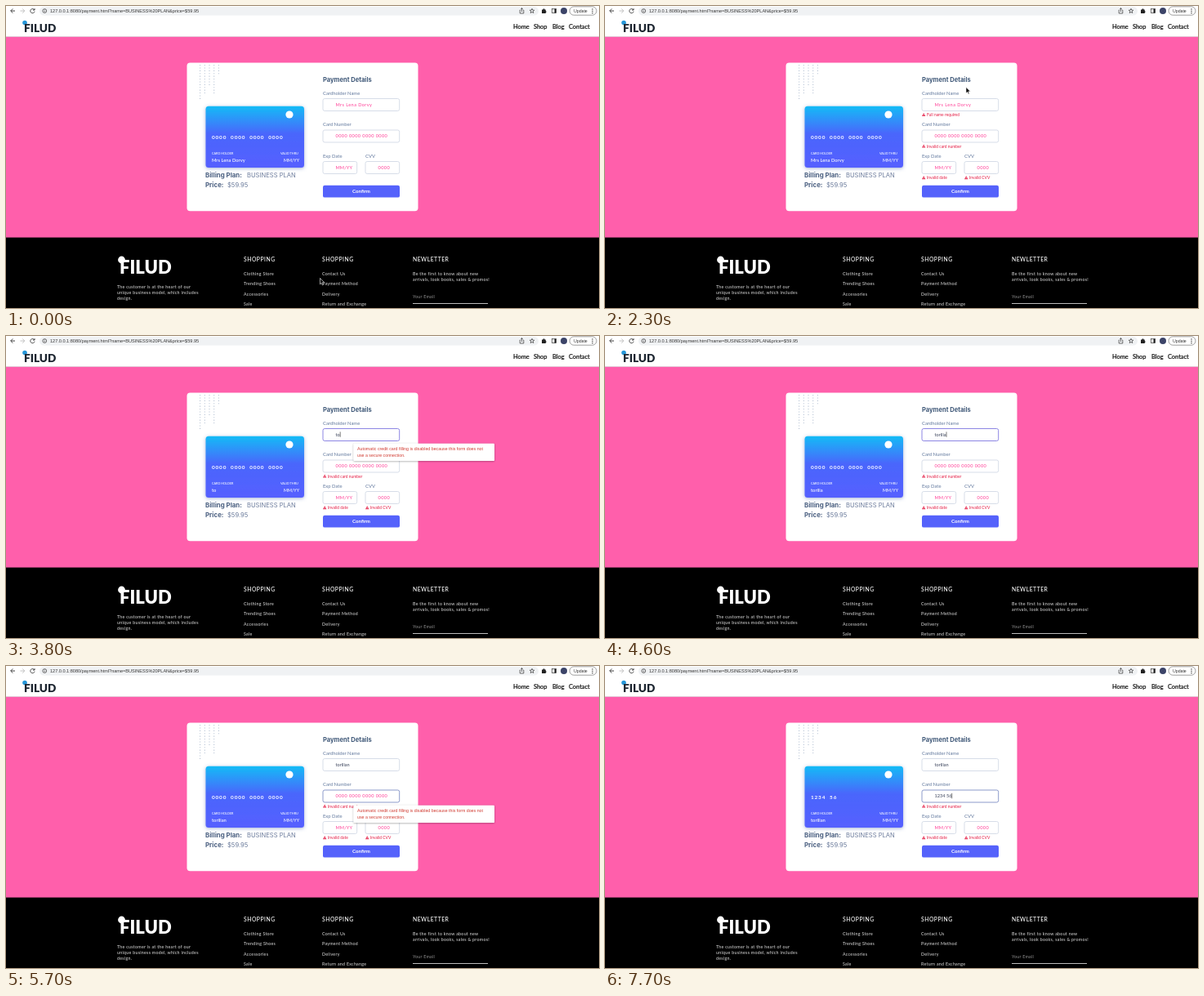
These frames come from a looping animation (726x370 px, 8 s). An HTML page:

```html
<!DOCTYPE html>
<html lang="en">
<head>
<meta charset="utf-8">
<title>Payment form</title>
<style>
  html, body { margin: 0; width: 100%; height: 100%; overflow: hidden; background: #fff; }
  svg { display: block; width: 726px; height: 370px; }
  text { font-family: Lato, "Open Sans", sans-serif; font-weight: 500; white-space: pre; }
  .ui { font: 5.57px "Liberation Sans", sans-serif; fill: #333; }
  .brand { font-weight: 900; }
  .nav { font-size: 7.4px; fill: #111; stroke: #111; stroke-width: .18; }
  .title { font: 700 7.55px Inter, sans-serif; fill: #3f5878; }
  .key { font: 700 7.9px Inter, sans-serif; fill: #4a5f80; }
  .value { font: 400 7.6px Inter, sans-serif; fill: #6c7c9c; }
  .label { font-size: 5.85px; fill: #6e83a5; }
  .hint { font-size: 5.6px; letter-spacing: .4px; fill: #ff4d9e; }
  .typed { font-size: 5.6px; fill: #4a5268; }
  .error { font-size: 4.9px; fill: #e62e53; }
  .small { font-size: 3.75px; fill: #fff; }
  .holder { font-size: 5.8px; fill: #fff; }
  .digits { font-size: 6.4px; font-weight: 700; letter-spacing: .84px; word-spacing: 2.5px; fill: #fff; }
  .head { font-size: 6.8px; letter-spacing: .5px; fill: #fff; }
  .foot { font-size: 5.25px; letter-spacing: .29px; fill: #d0d0d0; }
  .tip { font: 5.27px "Liberation Sans", sans-serif; fill: #d03a30; }
  .line { fill: none; stroke: #333; stroke-width: .9; }
  .field { fill: #fff; stroke: #d3dae6; stroke-width: .9; }
</style>
</head>
<body>
<svg id="stage" viewBox="0 0 726 370">
  <defs>
    <linearGradient id="cardFill" x2="0" y2="1">
      <stop stop-color="#14bcf6"/>
      <stop offset=".45" stop-color="#4a66fc"/>
      <stop offset="1" stop-color="#5560ff"/>
    </linearGradient>
    <filter id="shadow" x="-20%" y="-30%" width="140%" height="170%">
      <feDropShadow dx="0" dy="1" stdDeviation="2.2" flood-color="#4b5fb0" flood-opacity=".5"/>
    </filter>
    <filter id="soft" x="-5%" y="-20%" width="110%" height="150%">
      <feDropShadow dx="0" dy=".6" stdDeviation=".8" flood-opacity=".35"/>
    </filter>
  </defs>

  <!-- page background -->
  <rect width="726" height="370" fill="#fff"/>
  <rect y="37.5" width="726" height="247" fill="#ff5fab"/>
  <rect y="37" width="726" height="1" fill="#e3c5d5"/>
  <rect y="283.6" width="726" height="87"/>

  <!-- browser bar -->
  <rect x="41" y="1" width="611" height="10.4" rx="5.2" fill="#f0f2f4"/>
  <path class="line" d="M11 6H5.8M8.3 3.4 5.7 6l2.6 2.6M34.6 4.6A2.6 2.6 0 1 0 35 6.7M35 3v2h-2"/>
  <path class="line" style="stroke:#bbb" d="M17.5 6h5.2M20.2 3.4 22.8 6l-2.6 2.6"/>
  <g class="line" style="stroke-width:.7">
    <circle cx="47.3" cy="6" r="2.4"/>
    <path d="M47.3 5.6v1.8M47.3 4.3v.6M630 5h-.8v4h4.6V5H633M631.5 7V2.6M630.2 3.8l1.3-1.3 1.3 1.3"/>
    <path d="M644 3.2l.8 1.9 2 .1-1.5 1.3.5 2-1.8-1.1-1.8 1.1.5-2-1.5-1.3 2-.1z"/>
    <rect x="668.5" y="3.6" width="5" height="5"/>
  </g>
  <path d="M656 4.4h1.4a1.1 1.1 0 0 1 2.2 0h1.2v1.5a1.1 1.1 0 0 1 0 2.1v1H656zM671.5 3.6h2v5h-2z" fill="#222"/>
  <circle cx="683" cy="6" r="4" fill="#3c4468"/>
  <rect x="690" y=".8" width="33" height="10.4" rx="5.2" fill="#fff" stroke="#888" stroke-width=".8"/>
  <path d="M718 3.3v6" stroke="#333" stroke-width="1.2" stroke-dasharray="1.2 1.2"/>

  <!-- brand -->
  <circle cx="23" cy="20.5" r="2.8" fill="#2596d8"/>
  <circle cx="141.5" cy="311" r="4.4" fill="#fff"/>

  <!-- panel -->
  <rect x="221.5" y="69.5" width="283" height="181.7" rx="4" fill="#fff"/>
  <g id="dots" stroke="#b9c5d6" stroke-width="1.1" stroke-dasharray="1.1 2.3"></g>
  <rect x="244.5" y="122.7" width="120.5" height="75.3" rx="3.5" fill="url(#cardFill)" filter="url(#shadow)"/>
  <circle cx="347" cy="133" r="4.6" fill="#fff"/>
  <rect id="nameBox" class="field" x="388" y="113.5" width="93.7" height="15" rx="2.2"/>
  <rect id="numberBox" class="field" x="388" y="152" width="93.7" height="15" rx="2.2"/>
  <rect class="field" x="388" y="190.5" width="41.7" height="15" rx="2.2"/>
  <rect class="field" x="440" y="190.5" width="41.7" height="15" rx="2.2"/>
  <rect id="button" x="388" y="219.8" width="94" height="14.8" rx="2.2"/>
  <path d="M498 364.5h92" stroke="#bbb"/>

  <g id="texts"></g>
  <rect id="caret" width=".6" height="6.4" fill="#222"/>
  <g id="tip" filter="url(#soft)">
    <rect x="425.5" y="131.7" width="172.5" height="21.3" rx="1" fill="#fff"/>
    <text class="tip" x="430" y="140.4">Automatic credit card filling is disabled because this form does not</text>
    <text class="tip" x="430" y="148">use a secure connection.</text>
  </g>
  <g id="pointer">
    <path id="arrow" d="M0 0v7.4l1.7-1.6 1.2 2.7 1.2-.5-1.2-2.7h2.4z" stroke="#fff" stroke-width=".6"/>
    <path id="hand" d="M-.6 0q.7-.8 1.2 0v2.6l2.6.7q.5.3.3 1.2L3 6.8H-.4L-2.3 4q.4-.8 1.7.3z" fill="#fff" stroke="#111" stroke-width=".6"/>
    <path id="beam" class="line" style="stroke-width:.6" d="M-1.3-3.3Q0-3.3 0-2.6V2.6Q0 3.3-1.3 3.3M1.3-3.3Q0-3.3 0-2.6M0 2.6Q0 3.3 1.3 3.3"/>
  </g>
</svg>
<script>
const LOOP = 8000, STEP = 100;
const HOLDER = "Mrs Lena Dorvy", ZEROS = "0000 0000 0000 0000";
const NS = "http://www.w3.org/2000/svg";
const $ = id => document.getElementById(id);
const show = (el, on) => { el.style.display = on ? "" : "none"; };

function add(parent, tag, attrs, content = "") {
  const el = parent.appendChild(document.createElementNS(NS, tag));
  for (const key in attrs) el.setAttribute(key, attrs[key]);
  el.textContent = content;
  return el;
}
const text = (cls, x, y, content, style = "") =>
  add($("texts"), "text", { class: cls, x, y, style }, content);
const lines = (cls, x, y, gap, list) =>
  list.forEach((line, i) => text(cls, x, y + i * gap, line));

function errorNote(x, y, message) {
  const group = add($("texts"), "g", { class: "error" });
  add(group, "path", { d: `M${x} ${y}h4.4l-2.2-4.1z` });
  add(group, "path", { d: `M${x + 2.2} ${y - 2.8}v2.2`, stroke: "#fff", "stroke-width": .5 });
  add(group, "text", { x: x + 6, y }, message);
  return group;
}

[115, 107, 97, 107, 84].forEach((bottom, i) =>
  add($("dots"), "path", { d: `M${237.6 + i * 5.7} 72V${bottom}` }));

text("ui", 54, 8, "127.0.0.1:8080/payment.html?name=BUSINESS%20PLAN&price=$59.95");
text("ui", 695, 8, "Update", "font-size:5.2px");
text("brand", 22, 32.3, "FILUD", "font-size:13.6px;fill:#1c2530");
text("brand", 139, 328.3, "FILUD", "font-size:22px;fill:#fff");
[[621, "Home"], [646, "Shop"], [669, "Blog"], [689, "Contact"]]
  .forEach(([x, word]) => text("nav", x, 28.2, word));

text("title", 388, 92.9, "Payment Details");
text("label", 388, 108.8, "Cardholder Name");
text("label", 388, 147.4, "Card Number");
text("label", 388, 186, "Exp Date");
text("label", 440, 186, "CVV");
text("hint", 403.5, 199.9, "MM/YY", "letter-spacing:.1px");
text("hint", 455.5, 199.9, "0000");
text("holder", 435, 229.2, "Confirm", "text-anchor:middle;font-weight:700;font-size:6.1px");
text("small", 252, 182, "CARD HOLDER");
text("small", 336, 182, "VALID THRU");
text("holder", 340, 191, "MM/YY", "font-size:5.3px");
text("key", 244, 209.6, "Billing Plan:");
text("value", 295, 209.6, "BUSINESS PLAN");
text("key", 244, 222.2, "Price:");
text("value", 271, 222.2, "$59.95");

lines("foot", 136, 345.6, 7, ["The customer is at the heart of our",
  "unique business model, which includes", "design."]);
text("head", 291, 313, "SHOPPING");
text("head", 387, 313, "SHOPPING");
text("head", 498, 313, "NEWLETTER");
lines("foot", 291, 329.7, 12.5, ["Clothing Store", "Trending Shoes", "Accessories", "Sale"]);
lines("foot", 387, 329.7, 12.5, ["Contact Us", "Payment Method", "Delivery", "Return and Exchange"]);
lines("foot", 498, 329.7, 7, ["Be the first to know about new", "arrivals, look books, sales & promos!"]);
text("foot", 498, 357.8, "Your Email", "fill:#888");

const nameInput = text("hint", 403.5, 122.7);
const numberInput = text("hint", 403.5, 161.2);
const cardNumber = text("digits", 252, 163.3);
const cardHolder = text("holder", 252, 191);
const nameError = errorNote(388, 135, "Full name required");
const otherErrors = [errorNote(388, 173.6, "Invalid card number"),
  errorNote(388, 212.2, "Invalid date"), errorNote(440, 212.2, "Invalid CVV")];

// Typing: one key time per character
const nameKeys = [3700, 3800, 4000, 4100, 4300, 4500, 4600, 4700];
const numberKeys = [6200, 6500, 6800, 7100, 7400, 7400, 7700];
const typed = (word, keys, t) => word.slice(0, keys.filter(k => k <= t).length);

function fill(input, word, placeholder) {
  input.textContent = word || placeholder;
  input.setAttribute("class", word ? "typed" : "hint");
}

// Pointer path: time, x, y
const path = [[0, 384.5, 333.5], [50, 384.5, 333.5], [200, 442, 250], [450, 442, 250],
  [600, 443.5, 231], [1550, 443.5, 231], [2100, 442, 105], [2250, 442, 105],
  [2300, 442, 99.5], [2500, 440, 117], [2800, 437, 120.5], [LOOP, 437, 120.5]];

function pointerAt(t) {
  const i = path.findIndex(p => p[0] > t);
  const [a, b] = [path[i - 1], path[i]];
  const k = (t - a[0]) / (b[0] - a[0]);
  return [1, 2].map(n => a[n] + (b[n] - a[n]) * k);
}

const within = (t, from, to) => t >= from && t < to;

function draw(t) {
  const [x, y] = pointerAt(t);
  const overButton = within(y, 220, 234), overField = within(y, 113, 128);
  $("pointer").setAttribute("transform", `translate(${x} ${y})`);
  show($("pointer"), t < 3000);
  show($("hand"), overButton);
  show($("beam"), overField);
  show($("arrow"), !overButton && !overField);
  $("button").style.fill = overButton ? "#3e5cf6" : "#5562fb";

  show(nameError, within(t, 1000, 3700));
  otherErrors.forEach(e => show(e, t >= 1000));

  const name = typed("torilian", nameKeys, t), number = typed("1234 56", numberKeys, t);
  fill(nameInput, name, HOLDER);
  fill(numberInput, number, ZEROS);
  cardHolder.textContent = name || HOLDER;
  cardNumber.textContent = number || ZEROS;

  const onName = within(t, 2500, 5200), onNumber = t >= 5200;
  $("nameBox").style.stroke = onName ? "#8079e0" : "";
  $("numberBox").style.stroke = onNumber ? "#7f8fc4" : "";
  const input = onName ? nameInput : numberInput;
  const word = onName ? name : number;
  $("caret").setAttribute("x", 403.6 + (word ? input.getComputedTextLength() : 0));
  $("caret").setAttribute("y", onName ? 117.4 : 155.9);
  show($("caret"), t >= 2500 && !within(t, 3000, 3500) && !within(t, 5100, 5200) && !within(t, 5700, 6200));

  const nameTip = within(t, 3000, 5300) && !within(t, 4600, 4700);
  const numberTip = within(t, 5400, 7400) && !within(t, 6500, 6600);
  show($("tip"), nameTip || numberTip);
  $("tip").setAttribute("transform", `translate(0 ${numberTip ? 39 : 0})`);
}

const start = performance.now();
function tick() {
  const t = (performance.now() - start) % LOOP;
  draw(Math.floor(t / STEP) * STEP);
  requestAnimationFrame(tick);
}
tick();
</script>
</body>
</html>
```
